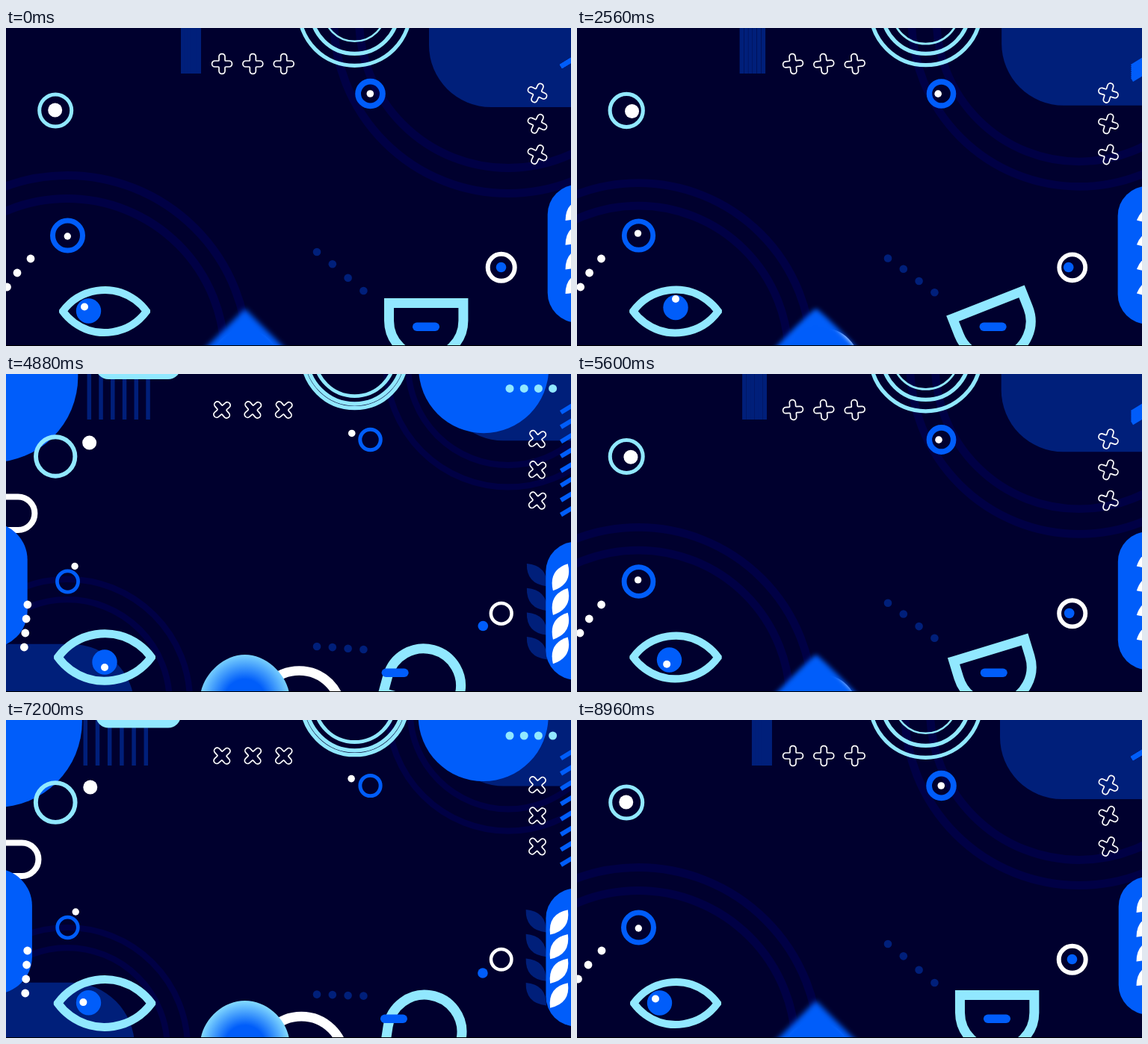
An HTML page with a canvas that plays this animation: 756x426 px, repeating every 9040 ms.

```html
<!DOCTYPE html>
<html lang="en">
<head>
<meta charset="utf-8">
<title>Geometric shapes</title>
<style>
html, body { margin: 0; width: 100%; height: 100%; overflow: hidden; background: #00002e; }
canvas { display: block; width: 100%; height: 100%; }
</style>
</head>
<body>
<canvas id="stage" width="756" height="426"></canvas>
<script>
const ctx = document.getElementById('stage').getContext('2d');
const LOOP = 9040, SWING = 1500;
const BG = '#00002e', FAINT = '#000045', NAVY = '#001f7a', BLUE = '#005dfa', CYAN = '#91e8ff', WHITE = '#fff';

const lerp = (a, b, k) => a + (b - a) * k;
const bezier = (a, b, t) => 3 * a * t * (1 - t) ** 2 + 3 * b * t * t * (1 - t) + t ** 3;

// cubic-bezier(.6, 0, .4, 1)
function ease(x) {
  let lo = 0, hi = 1;
  for (let i = 0; i < 24; i++) {
    const mid = (lo + hi) / 2;
    if (bezier(.6, .4, mid) < x) lo = mid; else hi = mid;
  }
  return bezier(0, 1, lo);
}

function disc(x, y, r, color) {
  ctx.fillStyle = color;
  ctx.beginPath();
  ctx.arc(x, y, r, 0, 7);
  ctx.fill();
}

// r is the outer radius
function ring(x, y, r, width, color) {
  ctx.strokeStyle = color;
  ctx.lineWidth = width;
  ctx.beginPath();
  ctx.arc(x, y, r - width / 2, 0, 7);
  ctx.stroke();
}

function box(x, y, w, h, r, color) {
  ctx.fillStyle = color;
  ctx.beginPath();
  ctx.roundRect(x, y, w, h, r);
  ctx.fill();
}

function at(x, y, angle, scale, draw) {
  ctx.save();
  ctx.translate(x, y);
  ctx.rotate(angle * Math.PI / 180);
  ctx.scale(scale, scale);
  draw();
  ctx.restore();
}

// Dot leaving the centre of a ring along a quadratic curve
function orbitDot(x, y, [cx, cy], [ex, ey], r, color, s) {
  const k = 2 * s * (1 - s);
  disc(x + k * cx + s * s * ex, y + k * cy + s * s * ey, r, color);
}

function cross(x, y, angle) {
  const L = 13.4, W = 4;
  at(x, y, angle, 1, () => {
    const points = [];
    for (let i = 0; i < 4; i++) {
      const c = [1, 0, -1, 0][i], n = [0, 1, 0, -1][i];
      for (const [px, py, r] of [[L, -W, 3.8], [L, W, 3.8], [W, W, 1]])
        points.push([px * c - py * n, px * n + py * c, r]);
    }
    ctx.beginPath();
    ctx.moveTo(L, 0);
    for (let i = 1; i <= 12; i++) {
      const [px, py, r] = points[i % 12], [qx, qy] = points[(i + 1) % 12];
      ctx.arcTo(px, py, qx, qy, r);
    }
    ctx.closePath();
    ctx.strokeStyle = WHITE;
    ctx.lineWidth = 1.7;
    ctx.stroke();
  });
}

// Leaf hanging from its tip; angle is clockwise from straight down
function leaf(x, y, angle, color) {
  at(x, y, angle, 1, () => {
    ctx.fillStyle = color;
    ctx.beginPath();
    ctx.moveTo(0, 0);
    ctx.quadraticCurveTo(-19, 20, 0, 41);
    ctx.quadraticCurveTo(19, 20, 0, 0);
    ctx.fill();
  });
}

function faintRings(x, y, outer, inner, s) {
  const width = lerp(11, 8, s);
  ring(x, y, lerp(outer[0], outer[1], s), width, FAINT);
  ring(x, y, lerp(inner[0], inner[1], s), width, FAINT);
}

// time, pupil x, y, glint x, y
const GAZE = [
  [0, 110.5, 379, 105, 373.5], [1280, 132, 379.5, 138.5, 373.5],
  [2560, 132, 374.5, 132, 363], [3700, 153, 379, 157, 378],
  [4880, 132, 386, 132, 393], [6560, 110.5, 378.5, 102, 382],
  [7920, 110.5, 379, 105, 373.5], [LOOP, 110.5, 379, 105, 373.5]
];

function eye(t, s) {
  at(132, 379.5, 0, lerp(1, 1.125, s), () => {
    ctx.beginPath();
    ctx.moveTo(-56, 0);
    ctx.arc(0, 40.8, 69.3, Math.PI + .63, -.63);
    ctx.arc(0, -40.8, 69.3, .63, Math.PI - .63);
    ctx.closePath();
    ctx.strokeStyle = CYAN;
    ctx.lineWidth = 10;
    ctx.stroke();
  });
  const i = GAZE.findIndex(key => key[0] > t);
  const a = GAZE[i - 1], b = GAZE[i], x = (t - a[0]) / (b[0] - a[0]);
  const g = a.map((v, j) => lerp(v, b[j], x * x * (3 - 2 * x)));
  disc(g[1], g[2], 16.7, BLUE);
  disc(g[3], g[4], 5, WHITE);
}

// Diamond that swells into a glowing ball
function ball(s) {
  const R = 60, h = R * .5523 * s;
  at(319.7, 436, 0, 1, () => {
    const glow = ctx.createRadialGradient(0, 0, 0, 0, 0, R);
    const k = s * s;
    glow.addColorStop(0, BLUE);
    glow.addColorStop(.45, BLUE);
    glow.addColorStop(1, `rgb(${145 * k},${lerp(93, 232, k)},${lerp(250, 255, k)})`);
    ctx.fillStyle = glow;
    if (s < .85) ctx.filter = `blur(${3.5 * (1 - s)}px)`;
    ctx.beginPath();
    ctx.moveTo(0, -R);
    ctx.bezierCurveTo(h, -R, R, -h, R, 0);
    ctx.bezierCurveTo(R, h, h, R, 0, R);
    ctx.bezierCurveTo(-h, R, -R, h, -R, 0);
    ctx.bezierCurveTo(-R, -h, -h, -R, 0, -R);
    ctx.fill();
  });
}

function cup(s) {
  at(562.2, 405, -180 * s, 1, () => {
    ctx.strokeStyle = CYAN;
    ctx.lineWidth = 13;
    ctx.beginPath();
    ctx.moveTo(-49.7, -36.5);
    ctx.lineTo(49.7, -36.5);
    ctx.lineTo(49.7, -13);
    ctx.arc(0, -13, 49.7, 0, Math.PI);
    ctx.closePath();
    ctx.stroke();
  });
  box(544 - 45.2 * s, 394.5, 36, 11.5, 5.75, BLUE);
}

function draw(t) {
  const phase = t % (2 * SWING) / SWING;
  const s = ease(phase < 1 ? phase : 2 - phase), away = 1 - s;

  ctx.fillStyle = BG;
  ctx.fillRect(0, 0, 756, 426);
  faintRings(82, 439, [247, 161], [216, 134], s);
  faintRings(672, -12, [239, 161], [205, 132], s);

  // top left
  ctx.fillStyle = NAVY;
  for (let i = 0; i < 6; i++) ctx.fillRect(234 - 137 * s + i * (4.3 + 12.5 * s), 0, 5.5, 61);
  disc(-6 - 150 * away, 40 * away, 115, BLUE);
  box(120, -45 - 95 * away, 114, 60, 17, CYAN);
  ring(66.2, 110.5, lerp(24, 29.6, s), lerp(5, 6, s), CYAN);
  orbitDot(65.7, 110, [34, 9], [48.5, -23], 9.5, WHITE, s);
  for (const x of [289, 330.3, 371.7]) cross(x, 48, -45 * s);

  // top centre
  const mid = 466.5, top = -24;
  ring(mid, top, 77 - 2 * s - 40 * s * s * away, 5.3, CYAN);
  ring(mid, top, 61 + 8 * s ** 4, 5.3, CYAN);
  ring(mid, top, 43 + 13 * (1 - away ** 2.5), lerp(2.5, 5, s), CYAN);

  // top right
  box(566 + 18 * s, -150, 300, 256 - 18.3 * s, 83, NAVY);
  disc(638 + 14 * away, -2 - 114 * away ** 1.2, 87, BLUE);
  for (let i = 0; i < 4; i++) disc(674 + 19.2 * i, 23 - 42 * away, 5.5, CYAN);
  ctx.strokeStyle = BLUE;
  ctx.lineWidth = 6;
  for (let i = 0; i < 8; i++) {
    const y = 51.5 + 21.4 * s * i;
    ctx.beginPath();
    ctx.moveTo(742.5, y);
    ctx.lineTo(764, y - 13);
    ctx.stroke();
  }
  for (const y of [87, 128.3, 169.5]) cross(711, y, 25 - 70 * s);
  ring(487.5, 88, lerp(20.3, 15.9, s), lerp(7.8, 4.8, s), BLUE);
  orbitDot(487.3, 88, [-18, 1.5], [-26, -10.5], 4.8, WHITE, s);

  // right
  for (let i = 0; i < 4; i++) leaf(694 + 34 * away, 254 + 32.7 * i, -42, NAVY);
  box(724.7 - 2 * s - 8 * s * away, 209.7 + 16.5 * s, 80, 185, 41, BLUE);
  for (let i = 0; i < 4; i++)
    leaf(lerp(748.5, 752, s), lerp(258, 254, s) + 32.7 * i, 44 - 180 * away, WHITE);
  ring(662.7, 320.8, lerp(21, 15.7, s), lerp(6, 4.4, s), WHITE);
  orbitDot(662.5, 320.5, [-21, -1.5], [-25, 20.5], 6.8, BLUE, s);

  // left
  box(-180, 339 + 270 * away, 352, 300, 85, NAVY);
  ctx.strokeStyle = WHITE;
  ctx.lineWidth = 8;
  ctx.beginPath();
  ctx.roundRect(-150, 164.5, 200 - 138 * away, 44.5, 22.25);
  ctx.stroke();
  box(-250, 199, 293 - 170 * away, 168, 50, BLUE);
  [[33, 28.5], [15, 28.2], [1.5, 28], [-10, 27.5]].forEach(([a, b], i) =>
    disc(lerp(a, b, s), 309 + 19 * i, 5.4, WHITE));
  ring(82.5, 278, lerp(23.5, 15.8, s), lerp(7, 4.6, s), BLUE);
  orbitDot(82.3, 279, [-4.7, -17], [12.5, -22.5], 4.7, WHITE, s);

  // bottom
  eye(t, s);
  ring(320 + 79 * s, lerp(450, 454.5, s), lerp(46, 64.5, s), lerp(9, 13, s), WHITE);
  ball(s);
  [[300, 371], [316.3, 370.7], [334.7, 370.8], [352, 370.5]].forEach(([a, b], i) =>
    disc(416 + 20.8 * i, lerp(a, b, s), 5.3, NAVY));
  cup(s);

  ctx.fillStyle = '#000';
  ctx.fillRect(0, 425, 756, 1);
}

const start = performance.now();
function tick() {
  draw((performance.now() - start) % LOOP);
  requestAnimationFrame(tick);
}
tick();
</script>
</body>
</html>
```
